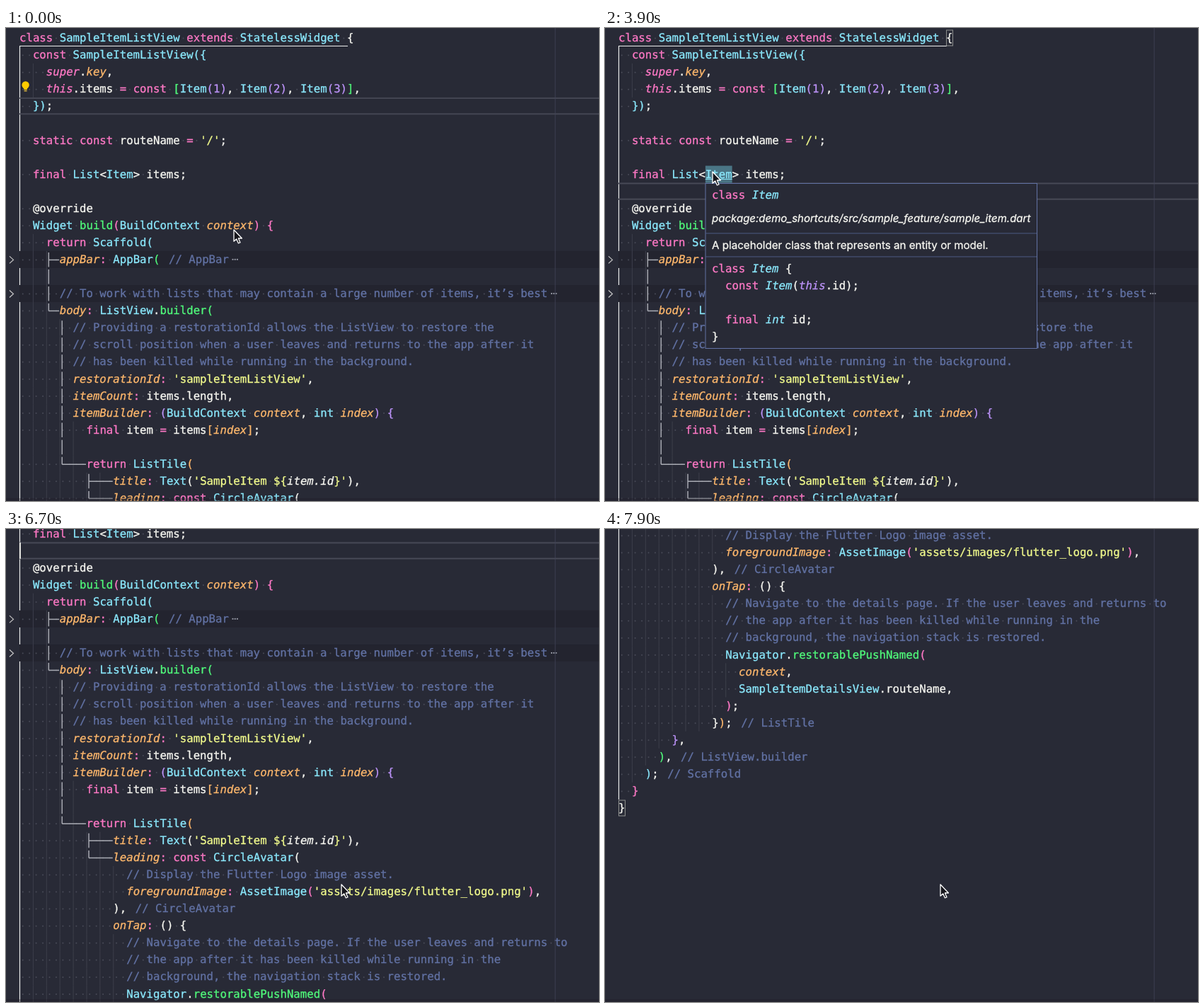
Recreate the animation shown at these times as an HTML page. Size 838 by 668 pixels, loop 8000 ms.

```html
<!DOCTYPE html>
<html lang="en">
<head>
<meta charset="utf-8">
<title>Editor hover</title>
<style>
html, body { margin: 0; width: 100%; height: 100%; overflow: hidden; background: #282a36; }
svg { display: block; width: 838px; height: 668px; }
text {
  font: 15.7px "DejaVu Sans Mono", "Liberation Mono", monospace;
  text-rendering: geometricPrecision;
  white-space: pre;
  stroke-width: .3px;
}
.prose { font: 15.16px Inter, "Open Sans", sans-serif; }
.it { font-style: italic; }
.prose.it { font-size: 15.02px; }
</style>
</head>
<body>
<svg id="stage" viewBox="0 0 838 668" xmlns="http://www.w3.org/2000/svg"></svg>
<script>
const CW = 9.45, LH = 24.07, LEFT = 19, MID = 14, BASE = 5.1;
const LOOP = 8000, CLICK = 1000;
const COLORS = { p: '#ff79c6', c: '#8be9fd', g: '#50fa7b', o: '#ffb86c', y: '#f1fa8c',
  v: '#bd93f9', m: '#6272a4', w: '#f8f8f2', d: '#6272a4' };

// Each line: indent, then runs split by "|"; a run starts with its colour key,
// upper case for italic, "d" for an editor label set off from the code.
const LINES = `0 pclass |cSampleItemListView |pextends |cStatelessWidget |w{
2 pconst |cSampleItemListView({
4 Psuper|w.|Okey|w,
4 Pthis|w.items |p= const |g[|cItem|v(1)|w, |cItem|v(2)|w, |cItem|v(3)|g]|w,
2 c})|w;
2 
2 pstatic const |wrouteName |p= |y'/'|w;
2 
2 pfinal |cList|w<|cItem|w> items;
2 
2 w@override
2 cWidget |gbuild|p(|cBuildContext |Ocontext|p) {
4 preturn |cScaffold(
6 OappBar|p: |cAppBar|g(|d// AppBar
6 
6 m// To work with lists that may contain a large number of items, it’s best
6 Obody|p: |cListView|w.|gbuilder(
8 m// Providing a restorationId allows the ListView to restore the
8 m// scroll position when a user leaves and returns to the app after it
8 m// has been killed while running in the background.
8 OrestorationId|p: |y'sampleItemListView'|w,
8 OitemCount|p: |witems.length,
8 OitemBuilder|p: |v(|cBuildContext |Ocontext|w, |cint |Oindex|v) {
10 pfinal |witem |p= |witems|o[|Oindex|o]|w;
10 
10 preturn |cListTile|o(
14 Otitle|p: |cText|w(|y'SampleItem \${|Witem.id|y}'|w),
14 Oleading|p: const |cCircleAvatar|w(
16 m// Display the Flutter Logo image asset.
16 OforegroundImage|p: |cAssetImage|p(|y'assets/images/flutter_logo.png'|p)|w,
14 w),|d// CircleAvatar
14 OonTap|p: |w() {
16 m// Navigate to the details page. If the user leaves and returns to
16 m// the app after it has been killed while running in the
16 m// background, the navigation stack is restored.
16 cNavigator|w.|grestorablePushNamed|p(
18 Ocontext|w,
18 cSampleItemDetailsView|w.routeName,
16 p)|w;
14 w}|o)|w;|d// ListTile
8 v}|w,
6 g)|w,|d// ListView.builder
4 c)|w;|d// Scaffold
2 p}
0 w}`.split('\n');
const FOLDS = [13, 15];

const stage = document.getElementById('stage');
const colX = c => LEFT + c * CW;
const midY = n => MID + n * LH;

function add(parent, tag, attrs, content) {
  const node = document.createElementNS('http://www.w3.org/2000/svg', tag);
  for (const k in attrs) node.setAttribute(k, attrs[k]);
  if (content) node.textContent = content;
  parent.appendChild(node);
  return node;
}
const rect = (parent, x, y, width, height, fill, more) =>
  add(parent, 'rect', { x, y, width, height, fill, ...more });
const stroke = (parent, d, color, width, more) =>
  add(parent, 'path', { d, fill: 'none', stroke: color, 'stroke-width': width, ...more });
const show = (node, on) => node.setAttribute('visibility', on ? 'visible' : 'hidden');
// The thin outline thickens the glyphs like desktop font smoothing.
const label = (parent, x, y, color, style, content) =>
  add(parent, 'text', { x, y, fill: color, stroke: color, class: style }, content);

// Draws coloured runs and returns the x where they end.
function drawRuns(parent, runs, x, mid, onSpace) {
  for (const run of runs.split('|')) {
    const key = run[0], body = run.slice(1);
    if (!body) continue;
    const low = key.toLowerCase();
    if (key === 'd') x += 12.5;
    label(parent, x, mid + BASE, COLORS[low], key === low ? '' : 'it', body);
    if (onSpace && key !== 'd')
      [...body].forEach((ch, i) => { if (ch === ' ') onSpace(x + i * CW, mid); });
    x += body.length * CW;
  }
  return x;
}

const page = add(stage, 'g', {});
const backdrop = add(page, 'g', {});
let dots = '', guides = '', spine = '';
const dot = (x, y) => { dots += `M${x + CW / 2} ${y + .5}h.01`; };
const code = add(page, 'g', {});

LINES.forEach((line, n) => {
  const cut = line.indexOf(' ');
  const indent = +line.slice(0, cut), runs = line.slice(cut + 1);
  const mid = midY(n), top = mid - LH / 2;
  const folded = FOLDS.includes(n);
  if (folded) rect(backdrop, LEFT, top, 838 - LEFT, LH, '#23242f');
  for (let c = 2; c < indent; c += 2) guides += `M${colX(c) + .5} ${top}v${LH}`;
  if (n > 0 && indent && !folded) spine += `M${LEFT + .5} ${top}v${LH}`;
  if (runs) for (let c = 0; c < indent; c++) dot(colX(c), mid);
  const end = drawRuns(code, runs, colX(indent), mid, dot);
  if (folded) {
    for (let i = 0; i < 3; i++) rect(code, end + 4.5 + i * 3.2, mid - 1, 2, 2, '#8f929e');
    stroke(page, `M5 ${mid - 4.5}l5.5 5l-5.5 5`, '#c5c5c5', 1.2);
  }
});
stroke(backdrop, guides, '#3d3f4b', 1);
stroke(backdrop, dots, '#484a57', 2, { 'stroke-linecap': 'round' });
stroke(backdrop, `${spine}M${LEFT} 25.5H483`, '#eceded', 1.2);

// Widget tree lines: vertical part per line, with an arm to the child.
let tree = '';
function branch(col, line, arm, last) {
  const x = colX(col + .5) - 1.2, y = midY(line) + .5;
  tree += `M${x} ${y - 10.5}V${last ? y : y + 10}`;
  if (arm) tree += `M${x} ${y}H${colX(arm) - .5}`;
}
branch(4, 13, 6);
branch(4, 14);
branch(4, 15);
branch(4, 16, 6, true);
for (let n = 17; n < 25; n++) branch(6, n);
branch(6, 25, 10, true);
branch(10, 26, 14);
branch(10, 27, 14, true);
stroke(page, tree, '#a9abb3', 1.5);

const lineBox = add(page, 'g', {});
stroke(lineBox, `M${LEFT} .9H838M${LEFT} ${LH - .9}H838`, '#474956', 1.8);
const caret = rect(page, LEFT, midY(9) - 11.5, 1.8, 23, '#f8f8f2');

const pair = add(page, 'g', {});
for (const [c, n] of [[49, 0], [0, 44]])
  rect(pair, colX(c) + .5, midY(n) - 11, CW - .5, 22, 'none', { stroke: '#8f918f' });

const bulb = add(page, 'g', {});
add(bulb, 'circle', { cx: 27.6, cy: 80.5, r: 5.2, fill: '#ffcc00' });
rect(bulb, 25.3, 84, 4.6, 3, '#ffcc00');
rect(bulb, 25.6, 87.6, 4, 2, '#c5a53a');

const mark = add(page, 'g', {});
rect(mark, colX(13), midY(8) - 12, 4 * CW, LH, '#4a7585');
drawRuns(mark, 'cItem', colX(13), midY(8));
const link = stroke(page, `M${colX(13)} 213.5h${4 * CW}`, '#8be9fd', 1.2);

const popup = add(page, 'g', {});
rect(popup, 142, 219.5, 468.5, 233, '#282a36', { stroke: '#6272a4' });
stroke(popup, 'M142 290H610M142 323H610', '#4d5a84', 1);
const card = (runs, x, y) => drawRuns(popup, runs, x, y);
card('pclass |CItem', 151, 236);
label(popup, 151, 274, COLORS.w, 'prose it',
  'package:demo_shortcuts/src/sample_feature/sample_item.dart');
label(popup, 151, 312, COLORS.w, 'prose',
  'A placeholder class that represents an entity or model.');
card('pclass |CItem |w{', 151, 340);
card('pconst |CItem|w(|Vthis|w.id);', 170, 364);
card('pfinal |Cint |wid;', 170, 412);
card('w}', 151, 436);

rect(stage, 775.6, 0, 1, 668, '#44475a', { opacity: .8 });
rect(stage, 0, 664, 838, 4, '#1c1a24', { opacity: .3 });
const arrow = add(stage, 'path', {
  d: 'M0 0V16.3L3.7 13L6.4 19L9 17.9L6.4 12H11.4Z',
  fill: '#15151b', stroke: '#fff', 'stroke-width': 1.3, 'stroke-linejoin': 'round'
});

const POINTER = [[0, 322, 285], [400, 312, 291], [500, 312, 291], [1000, 288, 226], [2700, 288, 226],
  [3500, 152, 203], [4600, 152, 203], [5200, 382, 214], [5400, 408, 194], [5500, 410, 193],
  [5600, 410, 193], [6300, 474, 502], [LOOP, 474, 502]];
const SCROLL = [[0, 0], [6500, 0], [6600, 45], [6700, 200], [6800, 420], [6900, 583],
  [7000, 650], [7100, 675], [7800, 675], [7900, 679], [LOOP, 679]];

function sample(keys, t) {
  const i = keys.findIndex((k, n) => n && t <= k[0]);
  const a = keys[i - 1], b = keys[i];
  const u = (t - a[0]) / (b[0] - a[0]), e = u * u * (3 - 2 * u);
  return a.slice(1).map((v, n) => v + (b[n + 1] - v) * e);
}

function draw(t) {
  const clicked = t >= CLICK;
  const [px, py] = sample(POINTER, t), [scroll] = sample(SCROLL, t);
  arrow.setAttribute('transform', `translate(${px} ${py})`);
  page.setAttribute('transform', `translate(0 ${-scroll})`);
  lineBox.setAttribute('transform', `translate(0 ${midY(clicked ? 9 : 4) - LH / 2})`);
  show(bulb, !clicked);
  show(pair, clicked);
  show(caret, clicked && (t < 1500 || Math.floor((t - 2700) / 633) % 2 === 0));
  show(mark, t >= 3700 && t < 5400);
  show(link, t >= 3700 && t < 4800);
  show(popup, t >= 3800 && t < 5400);
}

const start = performance.now();
function tick() {
  const t = (performance.now() - start) % LOOP;
  draw(Math.floor(t / 100) * 100);
  requestAnimationFrame(tick);
}
tick();
</script>
</body>
</html>
```
